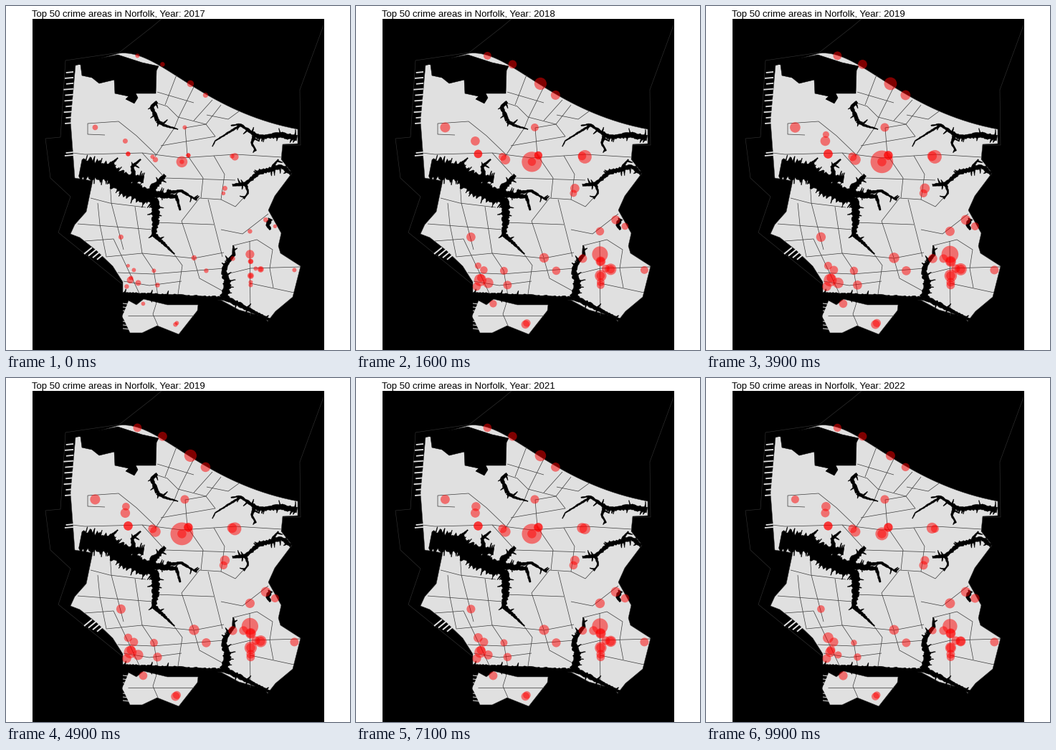
A matplotlib script for the animation above (10000 ms loop, 480 by 480 pixels).

```python
import numpy as np
import matplotlib.pyplot as plt
from matplotlib.animation import FuncAnimation
from matplotlib.patches import Polygon, Rectangle

FRAMES, INTERVAL = 100, 100
FIRST_YEAR, YEARS = 2017, 5
LAND, WATER, BORDER = "#e0e0e0", "black", "#3a3a3a"
rng = np.random.default_rng(4)

# x, y, early peak radius, final radius
NORTH = [
    (183, 69, 6, 5.6), (218, 81, 6.5, 6), (257, 108, 9.5, 6.5),
    (278, 124, 7.2, 5.7), (249, 169, 6, 6), (124, 169, 7.7, 5.5),
    (166, 188, 7, 6), (204, 210, 6, 6), (208, 214, 7.5, 7),
]
MIDDLE = [
    (245, 217, 15.6, 9), (254, 208, 6, 6), (170, 206, 6.5, 6),
    (315, 209, 6.5, 7.6), (319, 210, 10.4, 5.5), (305, 254, 7, 6),
    (303, 261, 5.5, 6), (362, 298, 6.8, 6.7), (375, 307, 5.4, 6.2),
    (340, 314, 6.4, 7),
]
EAST = [
    (341, 356, 7.6, 7), (355, 367, 8.8, 7), (341, 376, 9, 7.6),
    (340, 346, 12.2, 10.2), (262, 351, 7.4, 6.8), (279, 369, 6.4, 6),
    (316, 352, 6.6, 5.2), (348, 366, 6, 6), (341, 385, 6, 6),
    (341, 389, 6, 5.6), (402, 368, 6, 6),
]
SOUTH = [
    (160, 322, 7, 5.3), (170, 362, 5, 7.4), (178, 368, 5.8, 6.2),
    (173, 382, 9.5, 7), (174, 379, 6, 6), (184, 386, 8, 5),
    (168, 391, 6.4, 6), (206, 369, 6, 4.2), (211, 389, 6.6, 5.2),
    (191, 415, 5.7, 6.2), (236, 444, 6.4, 5.4), (238, 442, 5.8, 5),
]
LATE = [(167, 179, 3, 6.4), (331, 352, 5.7, 6)]  # listed from the second year
TWINS = [row for row in MIDDLE[:3] + EAST[:3]]   # a smaller dot sits on these


def profile(x, y, peak, end):
    mid = 0.6 * peak + 0.4 * end
    return x, y, peak / 2, peak, mid, end


dots = [profile(*d) for d in NORTH + MIDDLE + EAST + SOUTH + LATE]
dots += [profile(x, y, 6.3, 6.2) for x, y, *_ in TWINS]
dots = np.array(dots)
xy, radii = dots[:, :2] + 0.4, dots[:, 2:]
radii[radii[:, 1].argmax(), 2] = 16
late = np.array([(x, y) in [d[:2] for d in LATE] for x, y in dots[:, :2]])
radii[late, 2] = 6.2

fig = plt.figure(figsize=(480 / 72, 480 / 72), dpi=72, facecolor="white")
ax = fig.add_axes([0, 0, 1, 1])
ax.set(xlim=(0, 480), ylim=(480, 0))
ax.axis("off")
ax.add_patch(Rectangle((36.5, 17.5), 407, 463, fc=WATER, lw=0))


def pts(v):
    return np.array(v, float).reshape(-1, 2)


def area(p, color=LAND, edge=BORDER):
    ax.add_patch(Polygon(p, fc=color, ec=edge, lw=0.5))


def line(*v, color=BORDER, lw=0.7):
    ax.plot(*pts(v).T, color=color, lw=lw, solid_capstyle="butt")


def creek(w0, w1, *v, spurs=0):
    """Tapered water course with a ragged bank and random side spurs."""
    p = pts(v)
    d = np.r_[0, np.cumsum(np.hypot(*np.diff(p, axis=0).T))]
    s = np.linspace(0, d[-1], max(4, int(d[-1] / 2)))
    c = np.column_stack([np.interp(s, d, p[:, k]) for k in (0, 1)])
    t = np.gradient(c, axis=0)
    n = np.column_stack([-t[:, 1], t[:, 0]])
    n /= np.hypot(*n.T)[:, None] + 1e-9
    w = np.linspace(w0, w1, len(s)) / 2
    a, b = (w * rng.uniform(0.7, 1.35, len(s)) for _ in range(2))
    bank = np.r_[c + n * a[:, None], (c - n * b[:, None])[::-1]]
    ax.add_patch(Polygon(bank, fc=WATER, ec=WATER, lw=0.4, zorder=3))
    for i in rng.integers(1, len(s) - 1, spurs):
        side = rng.choice([-1, 1])
        tip = c[i] + n[i] * side * (w[i] + rng.uniform(3, 7)) + t[i]
        creek(2.6, 0.6, *c[i], *tip)


def bezier(a, b, c, d, n=40):
    t = np.linspace(0, 1, n)[:, None]
    a, b, c, d = map(np.array, (a, b, c, d))
    u = 1 - t
    return a * u**3 + 3 * b * u * u * t + 3 * c * u * t * t + d * t**3


# City limits running through open water
line(217, 18, 204, 29, 158, 65, 83, 76, 76, 183, 55, 185, 62, 240,
     90, 266, 73, 316, 162, 388, color="#333333", lw=0.6)
line(443, 27, 410, 117, 411, 194, 386, 194, color="#333333", lw=0.6)

# Mainland: bay shore, then clockwise
shore = bezier((158, 66), (215, 60), (270, 146), (407, 172))
east = pts([407, 192, 386, 193, 384, 214, 399, 233, 375, 265, 366, 285,
            384, 317, 380, 335, 383, 345, 411, 363, 400, 406, 376, 426,
            365, 440, 361, 434, 325, 424, 301, 411, 270, 405, 230, 403,
            163, 400])
west = pts([163, 385, 149, 363, 126, 341, 103, 323, 90, 318, 96, 305,
            112, 287, 121, 244, 96, 240, 90, 160, 97, 83])
area(np.r_[shore, east, west])
area(pts([97, 80, 104, 82, 106, 97, 120, 100, 130, 108, 151, 103, 152, 122,
          171, 126, 167, 130, 179, 136, 184, 128, 181, 122, 209, 122,
          210, 90, 213, 84, 190, 79, 156, 68]), WATER, WATER)
area(pts([171, 411, 182, 417, 192, 409, 225, 417, 268, 417, 267, 425,
          241, 458, 211, 446, 190, 456, 173, 456, 162, 433]))

# Piers
for y in [*np.linspace(93, 164, 10), 205, 209]:
    line(rng.uniform(80, 84), y, 94, y - 1, color=LAND, lw=1.8)
for k in range(4):
    x, y = 109 + 6 * k, 346 + 2.6 * k
    line(x, y, x + 11, y - 9, color=LAND, lw=2)
for y in range(415, 455, 5):
    line(163, y, 171, y + 1, color=LAND, lw=1)

# Tract borders
line(138, 180, 114, 179, 114, 164, 157, 161, 182, 181, 209, 207)
line(92, 205, 110, 207, 190, 205, 245, 212, 320, 207, 385, 211)
line(209, 135, 225, 140, 240, 155, 279, 165, 292, 182, 216, 195)
line(238, 96, 222, 138)
line(262, 113, 241, 155, 235, 170, 208, 210)
line(300, 138, 279, 165, 250, 170, 253, 208, 275, 240, 272, 268)
line(288, 131, 262, 160)
line(211, 120, 262, 135)
line(325, 147, 310, 158, 280, 152)
line(190, 205, 222, 240, 320, 243)
line(290, 209, 305, 235, 300, 270, 270, 268, 245, 300, 262, 351)
line(300, 270, 320, 280, 333, 266)
line(118, 268, 145, 275, 195, 281)
line(145, 245, 147, 275, 164, 340)
line(100, 304, 205, 312)
line(128, 275, 131, 305, 140, 350, 190, 345, 262, 352, 304, 344)
line(180, 280, 190, 345, 206, 369, 212, 404)
line(156, 372, 205, 374, 305, 366)
line(110, 328, 150, 325, 186, 401)
line(164, 384, 200, 390, 245, 384)
line(235, 347, 246, 362, 240, 402)
line(262, 352, 270, 380, 303, 398)
line(282, 270, 302, 350)
line(208, 302, 290, 305)
line(300, 312, 330, 318, 366, 290)
line(318, 334, 350, 326, 372, 340, 368, 366, 373, 393)
line(340, 328, 341, 432)
line(308, 374, 341, 366, 411, 364)
line(341, 387, 402, 400)
line(170, 432, 262, 432)
line(210, 414, 205, 430, 212, 446)

# Western river and its arms
creek(26, 22, 104, 225, 145, 233, 160, 244, spurs=8)
creek(24, 18, 152, 240, 168, 254, 200, 268, spurs=8)
creek(12, 8, 160, 238, 192, 242, spurs=5)
creek(14, 8, 197, 262, 208, 276, 209, 304, spurs=7)
creek(8, 1.5, 209, 302, 206, 318, 235, 346, spurs=3)
creek(12, 4, 197, 265, 207, 252, 222, 236, spurs=5)
creek(9, 2, 206, 262, 238, 266, 243, 285, spurs=5)
creek(5, 1.5, 225, 260, 245, 258, 266, 271, spurs=3)
creek(6, 1.5, 150, 230, 147, 220, 156, 212, spurs=2)
creek(6, 1.5, 178, 236, 176, 224, 188, 214, spurs=2)

# Northern creeks
creek(4, 5, 211, 134, 203, 140, 211, 160, spurs=3)
creek(5, 1, 211, 160, 222, 167, 240, 172, spurs=2)

# Eastern inlets
creek(8, 5, 406, 184, 385, 180, 350, 183, spurs=8)
creek(6, 1.5, 352, 183, 326, 165, 314, 167, spurs=3)
creek(5, 1.5, 346, 182, 343, 192, 349, 202, spurs=2)
creek(3, 1, 326, 167, 292, 188, 288, 196)
creek(5, 6, 398, 234, 385, 224, 354, 232, spurs=5)
creek(6, 3, 356, 230, 334, 248, 316, 250, spurs=5)
creek(4, 1, 372, 225, 380, 214, spurs=2)
creek(4, 1.5, 334, 248, 338, 260, 332, 269, spurs=1)
creek(6, 3, 369, 297, 365, 306, 369, 312)

# Southern branches
creek(12, 6, 304, 411, 309, 384, 304, 370, 309, 357, spurs=5)
creek(6, 1.5, 309, 357, 318, 347, 317, 334, spurs=2)
creek(7, 3, 308, 408, 340, 424, 368, 438, spurs=4)
creek(5, 5, 163, 402, 300, 408, spurs=10)

title = ax.text(36.2, 15, "", family="Liberation Sans", size=13.2,
                color="black", va="baseline")
bubbles = ax.scatter(*xy.T, color="red", alpha=0.5, linewidths=0, zorder=5)


def update(i):
    t = YEARS * i / (FRAMES - 1)
    r = np.array([np.interp(t, (0, 1, 3, YEARS), row) for row in radii])
    if t < 1:
        r[late] = 0
    bubbles.set_sizes((2 * r) ** 2)
    title.set_text(f"Top 50 crime areas in Norfolk, Year: {round(FIRST_YEAR + t)}")
    return bubbles, title


anim = FuncAnimation(fig, update, frames=FRAMES, interval=INTERVAL,
                     repeat=True, repeat_delay=0)
plt.show()
```
